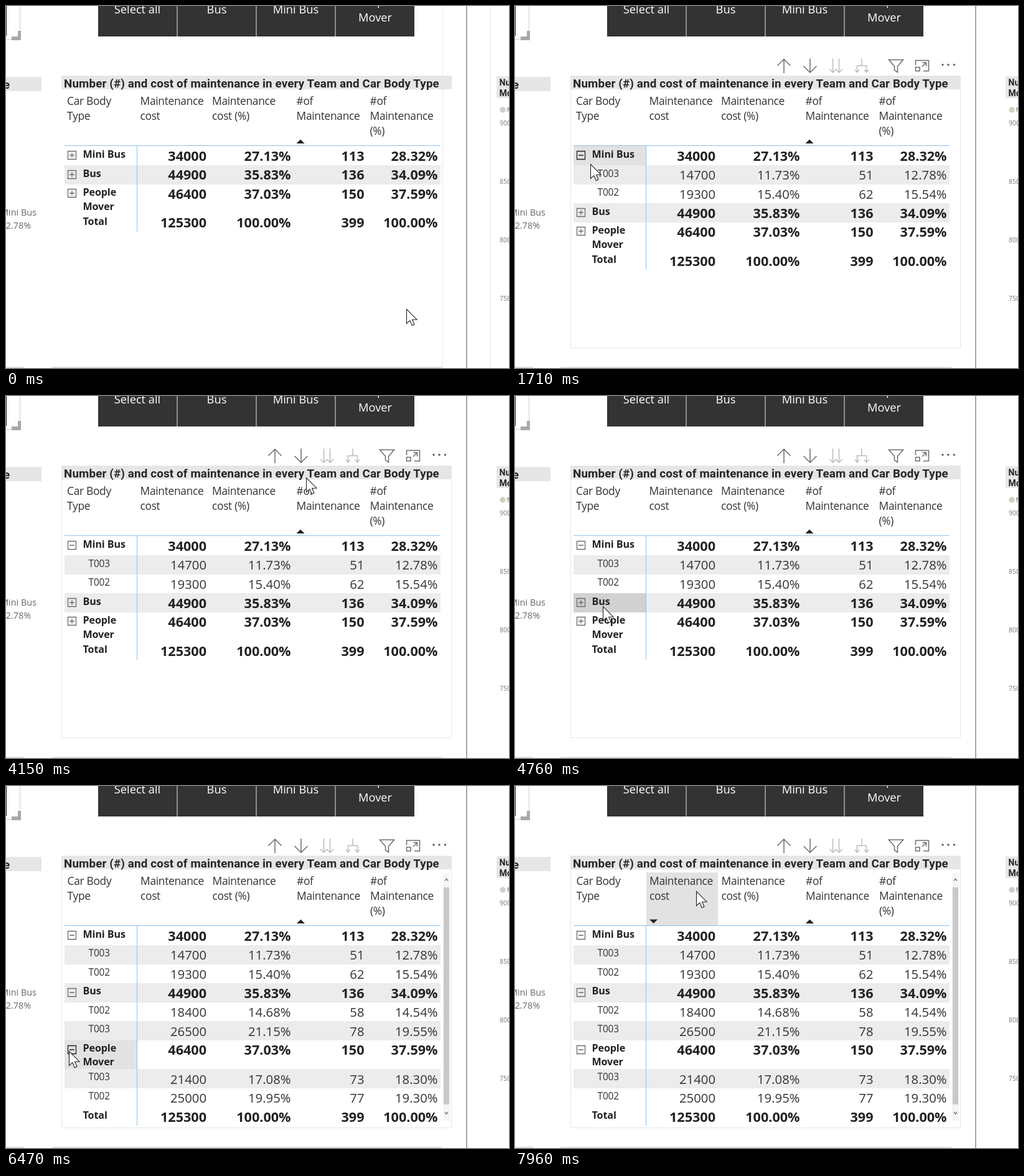
An HTML page that plays this animation: 808x582 px, repeating every 8000 ms.

```html
<!DOCTYPE html>
<html lang="en">
<head>
<meta charset="utf-8">
<title>Maintenance matrix</title>
<style>
  html, body { margin: 0; width: 100%; height: 100%; overflow: hidden; background: #fff; }
  svg { display: block; width: 808px; height: 582px; font-family: "Open Sans", "Noto Sans", sans-serif; }
  .title { font: 600 18.8px Roboto, sans-serif; letter-spacing: .13px; fill: #262626; }
  .title.mini { font-size: 14px; letter-spacing: 0; }
  .button { font-size: 18.3px; fill: #fff; text-anchor: middle; }
  .head { font-size: 17.4px; letter-spacing: -.32px; fill: #333; }
  .label { font-size: 15.4px; letter-spacing: -.1px; fill: #333; }
  .value { font-size: 20.3px; text-anchor: end; fill: #333; }
  .strong { font-weight: bold; fill: #222; }
  .label.strong { font-size: 16.1px; }
  .value.strong { font-size: 21.6px; }
  .side { font-size: 14.4px; text-anchor: end; fill: #666; }
  .axis { font-size: 10.5px; fill: #777; }
  .line { fill: none; stroke: #6b6b6b; stroke-width: 1.5; }
  .pale { stroke: #bcbcbc; }
  .blue { fill: none; stroke: #8fc4ef; }
</style>
</head>
<body>
<svg id="stage" viewBox="0 0 808 582" xmlns="http://www.w3.org/2000/svg">
  <g id="page"></g>
  <g id="guides"><path d="M701.5 0V582M778.5 0V582" stroke="#e6e6e6"/></g>
  <g id="bands"></g>
  <rect id="hover" fill="#000" fill-opacity=".115"/>
  <g id="heads"></g>
  <g id="table"></g>
  <path id="sortHint" d="M216 214.5h13l-6.500 6.500z" fill="#222"/>
  <g id="chrome">
    <path d="M89.500 134V549.500H715.500V134" fill="none" stroke="#e6e6e6"/>
    <g class="line">
      <path d="M432 108V85.500M421.500 96L432 85.500L442.500 96"/>
      <path d="M474 84.500V107M463.500 96.500L474 107L484.500 96.500"/>
      <path class="pale" d="M510.500 84.500V107M505 101.500l5.500 5.500l5.500-5.500M520.500 84.500V107M515 101.500l5.500 5.500l5.500-5.500"/>
      <path class="pale" d="M557 84.500V96M549.500 106V96H564.500V106M546 102.500l3.500 4l3.500-4M561 102.500l3.500 4l3.500-4"/>
      <path d="M600.500 86.500H623.500L614.500 97V106.500L609.500 103V97Z"/>
      <path d="M643.500 95V87.500H664.500V104.500H656M654.500 91H660.500V97M660.500 91L654 97.500M643.500 98.500H650V104.500H643.500Z"/>
    </g>
    <g fill="#666"><circle cx="687" cy="94.500" r="1.700"/><circle cx="696" cy="94.500" r="1.700"/><circle cx="705.500" cy="94.500" r="1.700"/></g>
  </g>
  <g id="scroll">
    <rect x="702" y="140" width="11" height="398" fill="#f5f5f5"/>
    <rect x="703" y="163" width="9" height="349" fill="#c9c9c9"/>
    <path d="M705 152.500l2.500-3.500l2.500 3.500M705 524l2.500 3.500l2.500-3.500" fill="none" stroke="#555" stroke-width="1.200"/>
  </g>
  <g id="tip">
    <rect x="444.500" y="312.500" width="77" height="30" fill="#fff" stroke="#b5b5b5"/>
    <text x="453" y="333" font-size="16" fill="#555">15.40%</text>
  </g>
  <path id="cursor" d="M.5.500V23.500L5.800 18.600L9.200 26.700L13 25L9.600 17.200H17Z" fill="#fff" stroke="#222" stroke-width="1.100"/>
</svg>
<script>
const $ = id => document.getElementById(id);
const text = (cls, x, y, s) => `<text class="${cls}" x="${x}" y="${y}">${s}</text>`;
const rect = (x, y, w, h, fill) => `<rect x="${x}" y="${y}" width="${w}" height="${h}" fill="${fill}"/>`;

const LOOP = 8000;
const TOP = 225.4, ROW = 30.6, TALL = 46.4;
const columns = [94, 211, 326, 462, 580, 698];
const rightEdges = [322, 457.5, 575.5, 693.5];
const opens = [1150, 5500, 6430];

const groups = [
  { name: ['Mini Bus'], values: ['34000', '27.13%', '113', '28.32%'], teams: [
    ['T003', '14700', '11.73%', '51', '12.78%'], ['T002', '19300', '15.40%', '62', '15.54%']] },
  { name: ['Bus'], values: ['44900', '35.83%', '136', '34.09%'], teams: [
    ['T002', '18400', '14.68%', '58', '14.54%'], ['T003', '26500', '21.15%', '78', '19.55%']] },
  { name: ['People', 'Mover'], values: ['46400', '37.03%', '150', '37.59%'], teams: [
    ['T003', '21400', '17.08%', '73', '18.30%'], ['T002', '25000', '19.95%', '77', '19.30%']] }
];

// time, x, y of the pointer tip
const path = [
  [0, 643, 487], [70, 643, 487], [400, 410, 385], [820, 103, 246], [1570, 106, 246],
  [1710, 120, 254], [1950, 240, 306], [2320, 426, 291], [2390, 429, 289], [3140, 429, 289],
  [3210, 480, 279], [3410, 487, 277], [3670, 487, 277], [4000, 486, 120], [4410, 476, 150],
  [4540, 270, 262], [4640, 150, 336], [4760, 141, 338], [5230, 104, 337], [5560, 99, 336],
  [5660, 104, 354], [5780, 114, 369], [6060, 101, 424], [6880, 101, 427], [7050, 140, 474],
  [7200, 170, 462], [7280, 236, 397], [7500, 335, 300], [7620, 350, 228], [7690, 345, 212],
  [7850, 300, 175], [7950, 291, 169], [LOOP, 291, 169]
];

function pointer(t) {
  const i = Math.max(1, path.findIndex(p => p[0] > t));
  const [a, b] = [path[i - 1], path[i]];
  const k = (t - a[0]) / (b[0] - a[0]);
  return [a[1] + (b[1] - a[1]) * k, a[2] + (b[2] - a[2]) * k];
}

function layout(stage) {
  const rows = [];
  let y = TOP;
  const add = (row, h) => { rows.push({ ...row, y, h }); y += h; };
  groups.forEach((g, i) => {
    const open = i < stage;
    add({ ...g, strong: true, sign: open ? '-' : '+' }, g.name.length > 1 ? TALL : ROW);
    if (open) g.teams.forEach(([name, ...values]) => add({ name: [name], values }, ROW));
  });
  add({ name: ['Total'], values: ['125300', '100.00%', '399', '100.00%'], strong: true, total: true }, ROW);
  return rows;
}

function rowMarkup(row, full) {
  const weight = row.strong ? ' strong' : '';
  const labelY = row.y + (full && row.y > TOP ? 18 : 18.6);
  let out = row.name.map((s, i) => text('label' + weight, row.strong ? 123.5 : 132.5, labelY + 22.4 * i, s)).join('');
  out += row.values.map((s, i) => text('value' + weight, rightEdges[i], row.y + 23.4, s)).join('');
  if (row.sign) {
    const y = Math.round(row.y + 14.6);
    const bar = row.sign === '+' ? `M106 ${y - 4}v8` : '';
    out += `<path class="line sign" style="stroke-width:1.3" d="M99.500 ${y - 6.5}h13v13h-13zM102 ${y}h8${bar}"/>`;
  }
  return out;
}

let rows, shownStage = -1;
function showTable(stage) {
  if (stage === shownStage) return;
  shownStage = stage;
  const full = stage === 3;
  rows = layout(stage);
  $('bands').innerHTML = rows.map((r, i) =>
    i % 2 && !r.total ? rect(94, Math.round(r.y), 604, Math.round(r.h), '#ececec') : '').join('');
  const last = rows[rows.length - 1];
  const bottom = Math.min(546, last.y + last.h - 1);
  $('table').innerHTML = rows.map(r => rowMarkup(r, full)).join('') +
    `<path class="blue" d="M94 224.500H698M210.500 225V${bottom}"/>`;
  $('heads').setAttribute('transform', `translate(${full ? 0.5 : 0})`);
  $('scroll').style.display = full ? '' : 'none';
}

function showHover(x, y) {
  const c = columns.findIndex((left, i) => x >= left && x < columns[i + 1]);
  const row = rows.find(r => y >= r.y && y < r.y + r.h);
  const head = y >= 139 && y < 224;
  const on = c >= 0 && (row || head);
  const hover = $('hover');
  hover.style.display = on ? '' : 'none';
  $('sortHint').style.display = head && c === 1 ? '' : 'none';
  if (on) {
    const box = head ? { y: 139, h: 85 } : row;
    const size = { x: columns[c], y: Math.round(box.y), width: columns[c + 1] - columns[c], height: Math.round(box.h) };
    for (const k in size) hover.setAttribute(k, size[k]);
  }
  const signed = rows.filter(r => r.sign);
  document.querySelectorAll('.sign').forEach((s, i) => {
    s.style.stroke = signed[i] === row && x < 118 ? '#222' : '';
  });
}

function drawPage() {
  const buttons = [['Select all', 211, 12], ['Bus', 338.5, 12], ['Mini Bus', 465.5, 12], ['People', 593, -1], ['Mover', 593, 25]];
  $('page').innerHTML =
    rect(148, 0, 508, 49, '#333') +
    [274.5, 401.5, 528.5].map(x => rect(x, 0, 1, 49, '#e8e8e8')).join('') +
    buttons.map(([s, x, y]) => text('button', x, y, s)).join('') +
    rect(0, 0, 1, 48, '#222') +
    '<path d="M22.500 0V41M0 53.500H10" stroke="#d0d0d0"/><path d="M19 40h5v15H9v-6h10z" fill="#a8a8a8"/>' +
    rect(0, 114, 57, 23, '#e6e6e6') + text('title', -4, 132.5, 'e') +
    rect(89, 112, 627, 22, '#e6e6e6') +
    text('title', 93, 130.5, 'Number (#) and cost of maintenance in every Team and Car Body Type') +
    text('side', 49, 337, 'Mini Bus') + text('side', 40, 357.5, '2.78%') +
    rect(739, 0, 2, 582, '#a6a6a6') +
    rect(788, 113, 20, 35, '#e6e6e6') +
    text('title mini', 792.5, 128, 'Number') + text('title mini', 792.5, 145, 'Mover') +
    '<circle id="dot" cx="798" cy="167" r="4.700"/>' + text('axis', 804.5, 171, 'Mini') +
    [900, 850, 800, 750].map((n, i) => text('axis', 793, 192 + 94 * i, n)).join('') +
    rect(0, 580, 29, 2, '#e0e0e0') + rect(73, 580, 628, 2, '#e0e0e0');

  const heads = [[98, 'Car Body', 'Type'], [215.5, 'Maintenance', 'cost'], [331, 'Maintenance', 'cost (%)'],
    [466.5, '#of', 'Maintenance'], [584.5, '#of', 'Maintenance', '(%)']];
  $('heads').innerHTML = heads.map(([x, ...lines]) =>
    lines.map((s, i) => text('head', x, 159 + 24 * i, s)).join('')).join('') +
    '<path d="M466.500 221h13l-6.500-6.500z" fill="#222"/>';
}

function draw(now) {
  const t = now % LOOP;
  const [x, y] = pointer(t);
  const active = t >= 130;
  showTable(opens.filter(at => t >= at).length);
  // the highlight trails the pointer slightly
  showHover(...pointer(Math.max(0, t - 80)));
  $('cursor').setAttribute('transform', `translate(${Math.round(x)} ${Math.round(y)})`);
  $('chrome').style.display = active ? '' : 'none';
  $('guides').style.display = active ? 'none' : '';
  $('tip').style.display = t >= 2730 && t < 3140 ? '' : 'none';
  $('dot').setAttribute('fill', t >= opens[0] && t < opens[1] ? '#d4cebc' : '#cfcfcd');
}

drawPage();
draw(0);
const start = performance.now();
(function frame() {
  draw(Math.max(0, performance.now() - start));
  requestAnimationFrame(frame);
})();
</script>
</body>
</html>
```
